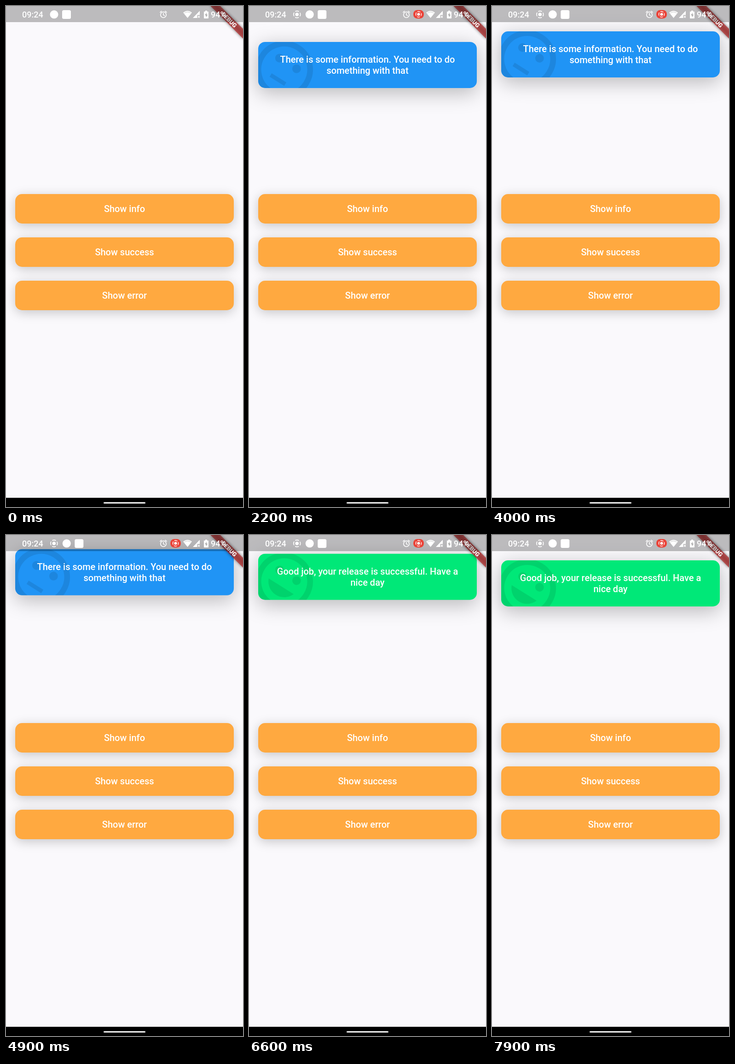
An HTML page that plays this animation: 515x1087 px, repeating every 8000 ms.

```html
<!DOCTYPE html>
<html>
<head>
<meta charset="utf-8">
<style>
  html, body { margin: 0; width: 100%; height: 100%; overflow: hidden; background: #faf9fc; }
  body { position: relative; font: 500 20px/23.6px Roboto, sans-serif; color: #fff; text-align: center; }
  .button, .toast { position: absolute; left: 20px; width: 475px; border-radius: 15px; }
  .button { height: 63.5px; line-height: 64px; background: #ffa940; box-shadow: 0 5px 25px rgba(0,0,0,.21); }
  .toast { top: 55px; height: 100px; box-shadow: 0 10px 44px 1px rgba(0,0,0,.26); }
  .toast svg { position: absolute; left: 0; top: 0; border-radius: 15px; }
  .toast p { position: absolute; left: 20px; right: 20px; top: 27px; margin: 0; }
  .dot { position: absolute; width: 27px; height: 27px; margin: -14px; border-radius: 50%;
         background: #fff; border: 1px solid #8a8078; }
  #chrome { position: absolute; left: 0; top: 0; }
</style>
</head>
<body>
<div class="button" style="top:408px">Show info</div>
<div class="button" style="top:502px">Show success</div>
<div class="button" style="top:596px">Show error</div>

<div class="toast" style="background:#2094f5">
  <svg width="475" height="100"><g class="face"><path d="M-3 3.4h6v1.4h-6z"/></g></svg>
  <p>There is some information. You need to do<br>something with that</p>
</div>
<div class="toast" style="background:#00e878">
  <svg width="475" height="100"><g class="face"><path d="M0 5.5C2.33 5.5 4.31 4.04 5.11 2H-5.11C-4.31 4.04-2.33 5.5 0 5.5z"/></g></svg>
  <p>Good job, your release is successful. Have a<br>nice day</p>
</div>

<div class="dot" style="left:414px;top:444px"></div>
<div class="dot" style="left:355px;top:540px"></div>

<svg id="chrome" width="515" height="1087" viewBox="0 0 515 1087">
  <defs>
    <filter id="soft" x="-20%" y="-80%" width="140%" height="260%"><feGaussianBlur stdDeviation="3"/></filter>
    <g id="rec">
      <circle r="7.4" fill="none" stroke="#fff" stroke-width="1.7" stroke-dasharray="8.4 3.22" stroke-dashoffset="4.2"/>
      <circle r="3.8" fill="#fff"/>
    </g>
  </defs>
  <g transform="translate(515 0) rotate(45)">
    <rect x="-50" y="35" width="100" height="15" opacity=".5" filter="url(#soft)"/>
    <rect x="-50" y="35" width="100" height="15" fill="#b71c1c" fill-opacity=".63"/>
    <text y="47" fill="#fff" font-size="12.75" font-weight="900" text-anchor="middle">DEBUG</text>
  </g>
  <rect width="515" height="35" opacity=".25"/>
  <g fill="#fff" font-size="18">
    <text x="35" y="25">09:24</text>
    <text x="445" y="25">94%</text>
    <g id="apps">
      <circle cx="104.5" cy="18.3" r="9"/>
      <rect x="122" y="9" width="19" height="19" rx="3.5"/>
    </g>
    <use href="#rec" id="recIcon"/>
    <g id="chip">
      <rect x="-11.5" y="-9.3" width="23" height="18.6" rx="8.5" fill="#ea4338"/>
      <use href="#rec" transform="scale(.82)"/>
    </g>
    <g fill="none" stroke="#fff" stroke-width="1.6">
      <circle cx="342" cy="19" r="6.2"/>
      <path d="M342 15v4.4l3 1.9M334.4 14.2l4-3.4M349.6 14.2l-4-3.4"/>
    </g>
    <path d="M394.500 26L385 14.300Q394.500 6.500 404 14.300z"/>
    <path d="M387.500 15.500Q394.500 10.500 401.500 15.500" fill="none" stroke="#bbb" stroke-width=".8"/>
    <path d="M406 26L421 10.500V19.500H415.500V26z"/>
    <path d="M417 21.500l4 4m0-4l-4 4" stroke="#fff" stroke-width="1.4"/>
    <path d="M433 10h4v2h2q1 0 1 1v13q0 1-1 1h-8q-1 0-1-1V13q0-1 1-1h2z"/>
    <path d="M435.800 14.500l-3.600 5.800h2.400v4.500l3.600-6h-2.400z" fill="#aaa"/>
  </g>
  <rect y="1067" width="515" height="20"/>
  <rect x="212" y="1076.500" width="91" height="3" rx="1.500" fill="#fff"/>
</svg>

<script>
const LOOP = 8000, SLIDE = 135, TOP_PAD = 20;
const all = s => [...document.querySelectorAll(s)];
const byId = id => document.getElementById(id);
const buttons = all('.button'), toasts = all('.toast'), dots = all('.dot');
const ramp = (t, a, b) => Math.min(1, Math.max(0, (t - a) / (b - a)));

for (const face of all('.face')) {
  face.setAttribute('transform', 'translate(56.5 60) rotate(32) scale(6.25)');
  face.setAttribute('opacity', .09);
  face.insertAdjacentHTML('beforeend',
    '<circle r="9" fill="none" stroke="#000" stroke-width="2"/>' +
    '<circle cx="-3.5" cy="-2.5" r="1.5"/><circle cx="3.5" cy="-2.5" r="1.5"/>');
}

const smooth = p => p * p * (3 - 2 * p);
const elasticOut = p => p <= 0 ? 0 : p >= 1 ? 1 :
  1 + 2 ** (-10 * p) * Math.sin((p - .1) * Math.PI * 5);

// cubic-bezier(.35, .91, .33, .97), solved by bisection
function linearToEaseOut(p) {
  const bez = (a, b, u) => 3 * a * u * (1 - u) ** 2 + 3 * b * u * u * (1 - u) + u ** 3;
  let lo = 0, hi = 1;
  for (let i = 0; i < 20; i++) {
    const mid = (lo + hi) / 2;
    if (bez(.35, .33, mid) < p) lo = mid; else hi = mid;
  }
  return bez(.91, .97, lo);
}

// scale that shrinks while pressed and grows back on release
const press = (t, down, held, up, end, depth) =>
  `scale(${1 - depth * (ramp(t, down, held) - ramp(t, up, end))})`;

function moveToast(el, t, show, hide) {
  const visible = t >= show && t < hide + 550;
  el.style.display = visible ? '' : 'none';
  if (!visible) return;
  const shown = t < hide ? elasticOut((t - show) / 1200) : linearToEaseOut(1 - ramp(t, hide, hide + 550));
  const lift = TOP_PAD * linearToEaseOut(ramp(t, hide, hide + 825));
  const y = SLIDE * (shown - 1) - lift;
  el.style.transform = `translateY(${y}px) ` + press(t, hide - 240, hide - 120, hide - 100, hide + 60, .03);
}

function draw(t) {
  const rec = smooth(ramp(t, 60, 500));
  byId('apps').setAttribute('transform', `translate(${27.3 * rec} 0)`);
  byId('recIcon').setAttribute('transform', `translate(104.300 18.300) scale(${rec})`);
  byId('chip').setAttribute('transform', `translate(368.500 18) scale(${rec})`);

  buttons[0].style.transform = press(t, 1730, 1790, 1805, 1920, .03);
  buttons[1].style.transform = press(t, 5960, 6160, 6340, 6500, .04);
  dots[0].style.opacity = t > 1720 && t < 1860 ? .38 : 0;
  dots[1].style.opacity = t > 5860 && t < 6350 ? .66 : 0;

  moveToast(toasts[0], t, 1920, 4640);
  moveToast(toasts[1], t, 6496, 9000);
}

const start = performance.now();
function tick() {
  draw((performance.now() - start) % LOOP);
  requestAnimationFrame(tick);
}
tick();
</script>
</body>
</html>
```
